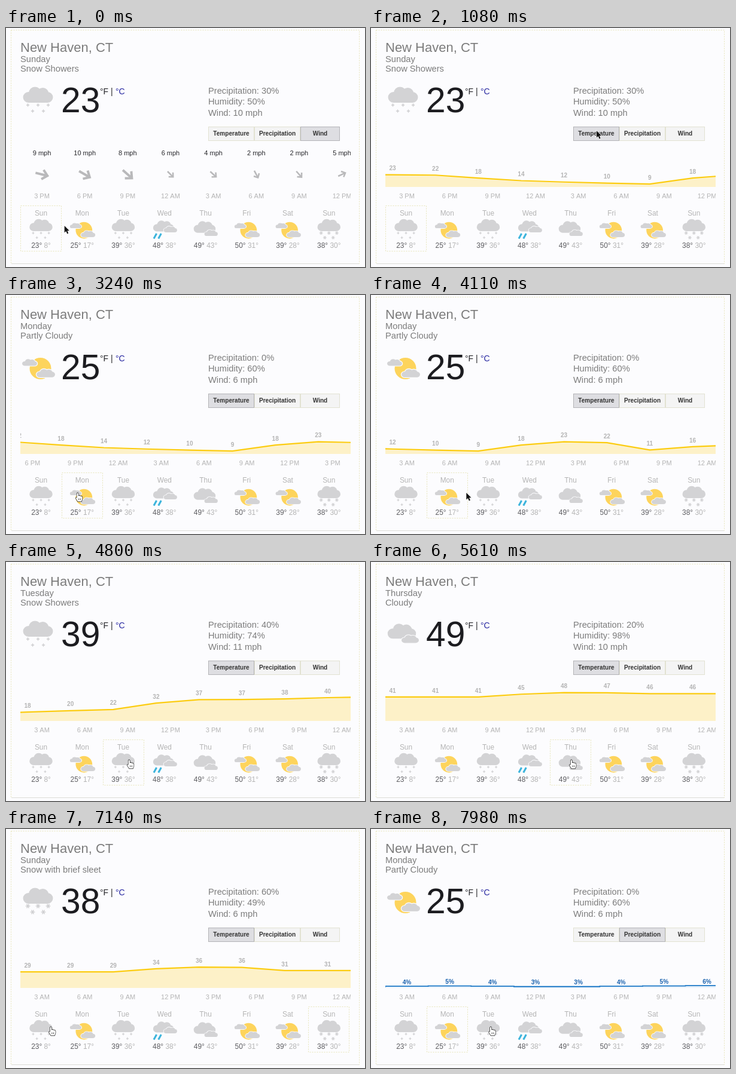
An HTML page with a canvas for the animation above (8 s loop, 600 px wide and 400 px high).

```html
<!DOCTYPE html>
<html lang="en">
<head>
<meta charset="utf-8">
<title>Weather card</title>
<style>
  html, body { margin: 0; width: 100%; height: 100%; overflow: hidden; background: #fcfcfe; }
  canvas { display: block; }
</style>
</head>
<body>
<canvas id="stage" width="600" height="400"></canvas>
<script>
const ctx = document.getElementById('stage').getContext('2d');
const LOOP = 8000, STEP = 71.65, LEFT = 24, RIGHT = 576, FLOOR = 266;
const SCROLL_MS = 240, TRAVEL_MS = 290, CLICK_DELAY = 60;
const BG = '#fcfcfe', GRAY = '#7c7c7c', PALE = '#b4b4b4', CLOUD = '#d3d3d5', SUN = '#fdd45c', DROP = '#3cb4dc';
const FONT = '"Liberation Sans", Arial, sans-serif';

// name, condition, icon, high, low, precipitation, humidity, wind, [dawn, peak, evening]
const DAYS = [
  ['Sunday', 'Snow Showers', 'snow', 23, 8, 30, 50, 10, [20, 23, 18]],
  ['Monday', 'Partly Cloudy', 'partly', 25, 17, 0, 60, 6, [9, 23, 10.5]],
  ['Tuesday', 'Snow Showers', 'snow', 39, 36, 40, 74, 11, [22, 37, 38]],
  ['Wednesday', 'Rain Showers', 'rain', 48, 38, 50, 85, 9, [42.6, 47, 41]],
  ['Thursday', 'Cloudy', 'cloudy', 49, 43, 20, 98, 10, [41, 47.6, 46]],
  ['Friday', 'Partly Cloudy', 'partly', 50, 31, 10, 70, 8, [46, 50, 34]],
  ['Saturday', 'Partly Cloudy', 'partly', 39, 28, 10, 55, 7, [30, 39, 29]],
  ['Sunday', 'Snow with brief sleet', 'sleet', 38, 30, 60, 49, 6, [29, 36.3, 31]]
];
const SLOTS = 8 * DAYS.length - 3;
const TABS = ['Temperature', 'Precipitation', 'Wind'];
const tabEdge = i => 338 + 77 * i - Math.max(0, i - 2) * 11;

// speed and heading in degrees
const WINDS = [[9, 14], [10, 30], [8, 42], [6, 45], [4, 42], [2, 62], [2, 48], [5, -25]];

// Pointer stops: arrival time, row, position counted in tabs or days; each stop after the first clicks
const STOPS = [
  [0, 'day', .57], [800, 'tab', 0], [1450, 'tab', 1], [2140, 'tab', 2], [2600, 'tab', 0],
  [3093, 'day', .89], [4240, 'day', 1.88], [5000, 'day', 3], [5290, 'day', 4.02], [5900, 'day', 5],
  [6200, 'day', 6], [6500, 'day', 7], [7110, 'day', .18], [7300, 'day', 1], [7580, 'tab', 1], [7950, 'day', 2.06]
];

const mix = (a, b, u) => a + (b - a) * u;
const ease = u => u * u * (3 - 2 * u);
const clamp = u => Math.min(Math.max(u, 0), 1);
const dayX = i => 58.5 + 68.75 * i;
const dayOffset = i => i ? (8 * i - 4) * STEP : 0;

// Clicks of one row up to now, newest last, starting from the opening choice
function clicks(row, opening, t) {
  const made = STOPS.slice(1).filter(([at, r]) => r === row && at + CLICK_DELAY <= t);
  return [[0, opening], ...made.map(([at, , pos]) => [at + CLICK_DELAY, Math.round(pos)])];
}

// Slot 0 is Sunday at 3 PM, each slot lasts three hours
function temperature(slot) {
  const day = Math.floor((slot + 2) / 8), h = (slot + 2) % 8;
  const [dawn, peak, evening] = DAYS[day].at(-1);
  const nextDawn = DAYS[day + 1]?.at(-1)[0] ?? evening;
  if (h < 2) return mix(dawn, peak, (h / 2) ** .64);
  if (h < 4) return mix(peak, evening, ((h - 2) / 2) ** 3.3);
  return mix(evening, nextDawn, ((h - 4) / 4) ** .6);
}

const rainChance = slot => slot < 2 ? 15 + 3 * slot
  : Math.round(2.6 + .2 * slot + 1.1 * Math.cos((slot - 5) * Math.PI / 3));

function text(str, x, y, size, color, align = 'left', weight = '') {
  ctx.font = `${weight} ${size}px ${FONT}`;
  ctx.textAlign = align;
  ctx.fillStyle = color;
  ctx.fillText(str, x, y);
}

function dashedBox(x, y, w, h) {
  ctx.strokeStyle = '#e6e4b8';
  ctx.lineWidth = 1;
  ctx.setLineDash([2, 2]);
  ctx.strokeRect(x + .5, y + .5, w, h);
  ctx.setLineDash([]);
}

function line(points, color, width) {
  ctx.beginPath();
  points.forEach(([x, y]) => ctx.lineTo(x, y));
  ctx.strokeStyle = color;
  ctx.lineWidth = width;
  ctx.stroke();
}

// Runs a drawing in its own translated, scaled and turned space
function at(x, y, scale, draw, angle = 0) {
  ctx.save();
  ctx.translate(x, y);
  ctx.rotate(angle);
  ctx.scale(scale, scale);
  draw();
  ctx.restore();
}

// A cloud 50 units wide, centred on the origin
function cloud(x, y, scale, outlined) {
  at(x, y, scale, () => {
    if (outlined) ctx.scale(1, .85);
    ctx.beginPath();
    for (const [cx, cy, r] of [[-16, 4, 9], [-5, -3, 10.5], [8, -2, 10], [16, 4, 9]]) {
      ctx.moveTo(cx + r, cy);
      ctx.arc(cx, cy, r, 0, 7);
    }
    ctx.rect(-16, 3, 32, 10);
    if (outlined) {
      ctx.strokeStyle = BG;
      ctx.lineWidth = 2.5 / scale;
      ctx.stroke();
    }
    ctx.fillStyle = CLOUD;
    ctx.fill();
  });
}

// Three flakes above two
function flakes(arms, size) {
  for (let i = 0; i < 5; i++) {
    const x = i < 3 ? 17 * (i - 1) : 18 * (i - 3.5), y = i < 3 ? 8 : 18;
    for (let k = 0; k < arms; k++)
      at(x, y, 1, () => line([[-size, 0], [size, 0]], '#cfcfd1', 1.5), k * Math.PI / arms);
  }
}

const ICONS = {
  snow() { cloud(0, -9, 1); flakes(2, 2.6); },
  sleet() { cloud(0, -9, 1); flakes(3, 3.8); },
  cloudy() {
    cloud(-2, -5, .95);
    cloud(12, 8, .58, true);
  },
  rain() {
    cloud(-2, -7, .9);
    cloud(13, 0, .58, true);
    for (const x of [-17, -7]) line([[x, 9], [x - 6, 20]], DROP, 4);
  },
  partly() {
    ctx.fillStyle = SUN;
    ctx.beginPath();
    ctx.arc(4, 2, 18, 0, 7);
    ctx.fill();
    cloud(-14, -8, .5, true);
    cloud(13, 10, .62, true);
  }
};

function drawHeader([name, condition, icon, high, , rain, humidity, wind]) {
  text('New Haven, CT', 24, 40, 22, GRAY);
  text(name, 24, 57, 14.7, GRAY);
  text(condition, 24, 73, 14.7, GRAY);
  at(53.5, 121, 1, ICONS[icon]);
  text(high, 92, 141, 58.7, '#1c1c20');
  text('°F |', 157, 111, 14, '#26262a');
  text('°C', 183, 111, 14, '#2626a0');
  [`Precipitation: ${rain}%`, `Humidity: ${humidity}%`, `Wind: ${wind} mph`]
    .forEach((label, i) => text(label, 338, 109.7 + 18.4 * i, 14.7, GRAY));
}

function drawTabs(active) {
  const box = (i, fill, border) => {
    const x = tabEdge(i), width = tabEdge(i + 1) - x;
    ctx.fillStyle = fill;
    ctx.fillRect(x, 165, width, 24);
    ctx.strokeStyle = border;
    ctx.lineWidth = 1;
    ctx.strokeRect(x + .5, 165.5, width - 1, 23);
  };
  TABS.forEach((_, i) => box(i, '#f4f4f4', '#e2e2d2'));
  box(active, '#dedee2', '#b4b4b8');
  TABS.forEach((label, i) => text(label, (tabEdge(i) + tabEdge(i + 1)) / 2, 180, 10.1, '#333', 'center', 'bold'));
}

function area(points, fill, stroke, width) {
  ctx.beginPath();
  ctx.moveTo(points[0][0], FLOOR);
  points.forEach(([x, y]) => ctx.lineTo(x, y));
  ctx.lineTo(points.at(-1)[0], FLOOR);
  ctx.fillStyle = fill;
  ctx.fill();
  line(points, stroke, width);
}

function drawTemperature(slots, offset) {
  const points = slots.map(i => [36 + STEP * i - offset, 271 - 1.1 * temperature(i)]);
  area([[points[0][0] - 20, points[0][1]], ...points], '#fdf1c8', '#fccc10', 2.2);
  points.forEach(([x, y], i) => text(Math.round(temperature(i)), x, y - 7.4, 10.1, PALE, 'center', 'bold'));
}

function drawPrecipitation(slots, offset) {
  const edge = i => LEFT + STEP * i - offset, level = i => 265.4 - .55 * rainChance(i);
  area(slots.flatMap(i => [[edge(i), level(i)], [edge(i + 1), level(i)]]), '#e9f2fb', '#1c78c6', 1.8);
  slots.forEach(i => text(rainChance(i) + '%', edge(i) + 36, level(i) - 3.4, 10.1, '#1a62ae', 'center', 'bold'));
}

function drawWind(slots, offset) {
  WINDS.forEach(([speed, heading], i) => {
    const x = 60 + STEP * i - offset;
    text(speed + ' mph', x, 212.5, 11, '#26262a', 'center');
    at(x, 245, speed > 7 ? 1 : .64, () => {
      line([[-11, 0], [8, 0]], '#b9b9bb', 4);
      line([[1, -8], [9.5, 0], [1, 8]], '#b9b9bb', 4);
    }, heading * Math.PI / 180);
  });
}

function drawChart(tab, offset) {
  const slots = Array.from({ length: SLOTS }, (_, i) => i);
  ctx.save();
  ctx.beginPath();
  ctx.rect(LEFT, 195, RIGHT - LEFT, 95);
  ctx.clip();
  [drawTemperature, drawPrecipitation, drawWind][tab](slots, offset);
  slots.forEach(i => {
    const hour = (15 + 3 * i) % 24;
    text(`${hour % 12 || 12} ${hour < 12 ? 'AM' : 'PM'}`, 60 + STEP * i - offset, 285, 11, PALE, 'center');
  });
  ctx.restore();
}

function drawDays(selected) {
  DAYS.forEach(([name, , icon, high, low], i) => {
    const x = dayX(i), hi = high + '° ', lo = low + '°';
    text(name.slice(0, 3), x, 314, 11.9, PALE, 'center');
    at(x, 337, .77, ICONS[icon]);
    ctx.font = `11.9px ${FONT}`;
    const start = x - ctx.measureText(hi + lo).width / 2;
    const split = start + ctx.measureText(hi).width;
    text(hi, start, 368, 11.9, '#5c5c60');
    text(lo, split, 368, 11.9, PALE);
  });
  dashedBox(Math.round(dayX(selected) - 34.5), 297, 68, 76);
}

const ARROW = new Path2D('M0 0V11.5L2.7 9L4.6 13.4L6.6 12.5L4.7 8.3H8.2Z');
const HAND = new Path2D('M-1.2 1.2Q0 -.8 1.2 1.2V5.2Q2.6 4 3.5 5.5Q5 4.6 5.8 6.2Q7.6 5.4 7.8 7.4V10.5L6.4 14.6H.2L-3 9.6Q-3.8 7.4-1.2 8.6Z');

const place = ([, row, pos]) => row === 'day' ? [dayX(pos), 331] : [377 + 74 * pos, 172];

function drawPointer(t) {
  const k = STOPS.findLastIndex(([arrival]) => arrival <= t);
  const here = STOPS[k], next = STOPS[k + 1] ?? here;
  const travel = Math.min(TRAVEL_MS, next[0] - here[0]) || 1;
  const u = next === here ? 0 : ease(clamp((t - next[0]) / travel + 1));
  const [x0, y0] = place(here), [x1, y1] = place(next);
  const x = mix(x0, x1, u), y = mix(y0, y1, u);
  const overDay = y > 297 && DAYS.some((_, i) => Math.abs(x - dayX(i)) < 28);
  at(x, y, 1, () => {
    ctx.lineWidth = 1.2;
    ctx.fillStyle = overDay ? '#fff' : '#111';
    ctx.strokeStyle = overDay ? '#111' : '#fff';
    const shape = overDay ? HAND : ARROW;
    ctx.stroke(shape);
    ctx.fill(shape);
    if (overDay) for (const fx of [2, 4.6]) line([[fx, 9.5], [fx, 12]], '#111', .8);
  });
}

function draw(t) {
  ctx.fillStyle = BG;
  ctx.fillRect(0, 0, 600, 400);
  dashedBox(8, 3, 582, 391);
  ctx.fillStyle = '#dcdcd6';
  ctx.fillRect(9, 394, 581, 1);

  const [, tab] = clicks('tab', 2, t).at(-1);
  const days = clicks('day', 0, t);
  const [clicked, day] = days.at(-1), [, previous] = days.at(-2) ?? days[0];
  const offset = mix(dayOffset(previous), dayOffset(day), ease(clamp((t - clicked) / SCROLL_MS)));

  drawHeader(DAYS[day]);
  drawTabs(tab);
  drawChart(tab, offset);
  drawDays(day);
  drawPointer(t);
}

const start = performance.now();
function frame() {
  draw((performance.now() - start) % LOOP);
  requestAnimationFrame(frame);
}
frame();
</script>
</body>
</html>
```
